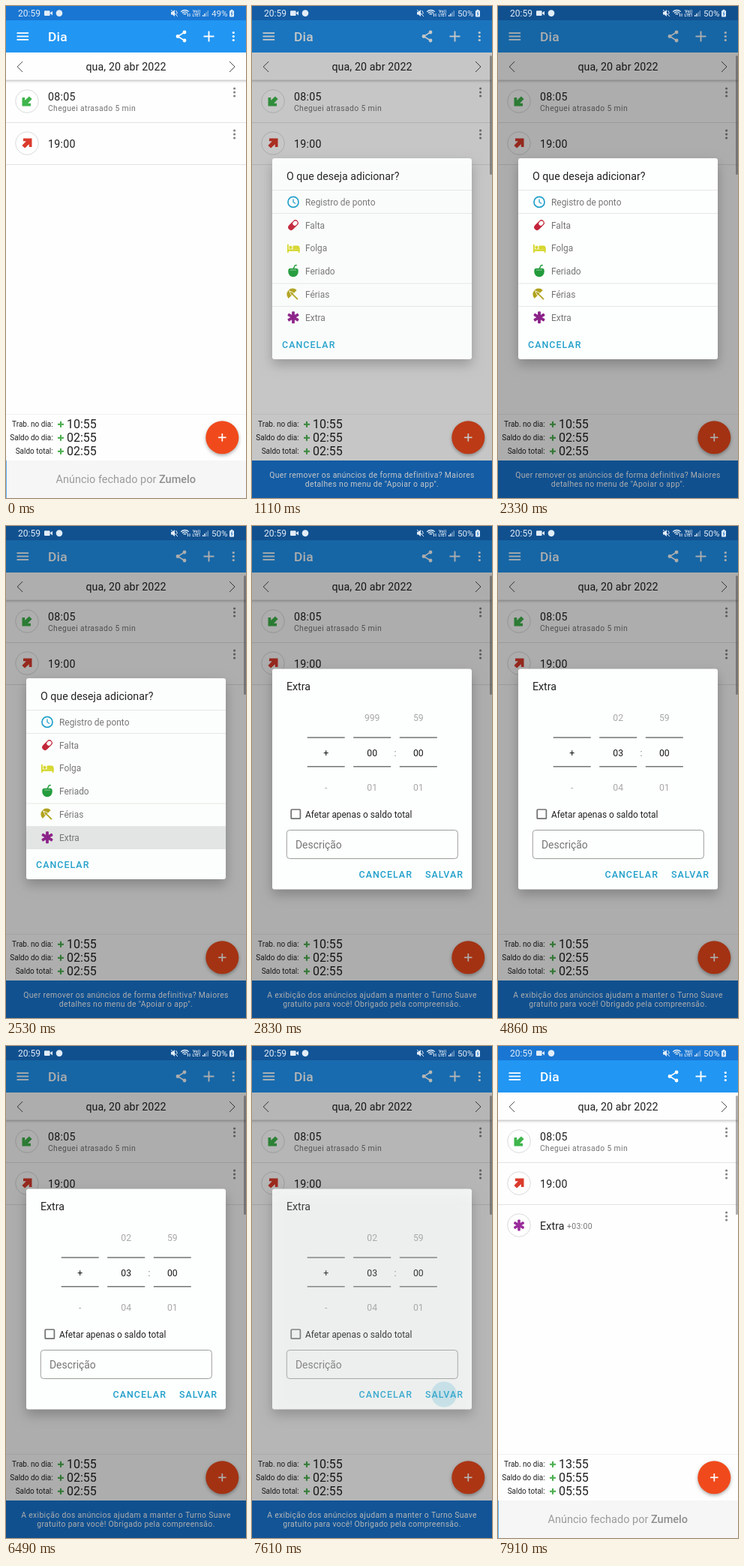
An HTML page with a canvas that plays this animation: 320 by 656 pixels, repeating every 8.53 s.

```html
<!DOCTYPE html>
<html lang="pt-BR">
<head>
<meta charset="utf-8">
<title>Registro do dia</title>
<style>
html, body { margin: 0; width: 100%; height: 100%; overflow: hidden; background: #fdfefd; }
canvas { display: block; width: 320px; height: 656px; }
</style>
</head>
<body>
<canvas id="stage"></canvas>
<script>
const LOOP = 8530, W = 320, H = 656;
const canvas = document.getElementById('stage');
const ctx = canvas.getContext('2d');
const dpr = window.devicePixelRatio || 1;
canvas.width = W * dpr;
canvas.height = H * dpr;

const INK = '#212121', GREY = '#757575', GREEN = '#3fb54c', RED = '#db3b2c',
      PURPLE = '#9a2c9b', ACCENT = '#219fca', LINE = '#e2e4e2';

const clamp = v => Math.max(0, Math.min(1, v));
const ramp = (t, a, b) => clamp((t - a) / (b - a));
const ease = v => v * v * (3 - 2 * v);

function text(str, x, y, size, color, { weight = 400, space = 0, align = 'left' } = {}) {
  ctx.font = `${weight} ${size}px Roboto, sans-serif`;
  ctx.letterSpacing = space + 'px';
  ctx.textAlign = align;
  ctx.fillStyle = color;
  ctx.fillText(str, x, y);
}
const caption = (str, x, y, color, align) => text(str, x, y, 10.4, color, { space: 0.346, align });
const button = (str, x, y) => text(str, x, y, 12.4, ACCENT, { weight: 500, space: 1.05 });

function rect(x, y, w, h, color) {
  ctx.fillStyle = color;
  ctx.fillRect(x, y, w, h);
}
function box(x, y, w, h, r, fill, stroke, width = 1) {
  ctx.beginPath();
  ctx.roundRect(x, y, w, h, r);
  if (fill) { ctx.fillStyle = fill; ctx.fill(); }
  if (stroke) { ctx.strokeStyle = stroke; ctx.lineWidth = width; ctx.stroke(); }
}
function disc(x, y, r, color) {
  ctx.beginPath();
  ctx.arc(x, y, r, 0, 2 * Math.PI);
  ctx.fillStyle = color;
  ctx.fill();
}
function ring(x, y, r, color, width = 1) {
  ctx.beginPath();
  ctx.arc(x, y, r, 0, 2 * Math.PI);
  ctx.strokeStyle = color;
  ctx.lineWidth = width;
  ctx.stroke();
}
function trace(points) {
  ctx.beginPath();
  points.forEach(([x, y]) => ctx.lineTo(x, y));
}
function line(points, color, width) {
  trace(points);
  ctx.strokeStyle = color;
  ctx.lineWidth = width;
  ctx.stroke();
}
function shape(points, color) {
  trace(points);
  ctx.fillStyle = color;
  ctx.fill();
}
function at(x, y, angle, draw) {
  ctx.save();
  ctx.translate(x, y);
  ctx.rotate(angle);
  draw();
  ctx.restore();
}
function shadow(blur, dy, alpha, draw) {
  ctx.save();
  ctx.shadowColor = `rgba(0,0,0,${alpha})`;
  ctx.shadowBlur = blur * dpr;
  ctx.shadowOffsetY = dy * dpr;
  draw();
  ctx.restore();
}
function plus(x, y, size, width, color) {
  rect(x - size / 2, y - width / 2, size, width, color);
  rect(x - width / 2, y - size / 2, width, size, color);
}
function kebab(x, y, color) {
  for (const d of [-5, 0, 5]) disc(x, y + d, 1.6, color);
}
function ripple(x, y, reach, p, color) {
  if (p <= 0 || p >= 1) return;
  ctx.save();
  ctx.globalAlpha *= 0.22 * Math.sin(Math.PI * p);
  disc(x, y, reach * (0.4 + 0.6 * p), color);
  ctx.restore();
}

function asterisk(x, y, size, color) {
  for (let i = 0; i < 3; i++) {
    at(x, y, i * Math.PI / 3, () => box(-size * 0.12, -size / 2, size * 0.24, size, 1, color));
  }
}
function arrow(x, y, angle, color) {
  at(x, y, angle, () => shape([
    [-6.5, -5], [-2.8, -5], [-2.8, -1.2], [2.9, -6.6], [6.6, -2.9],
    [1.2, 2.8], [5, 2.8], [5, 6.5], [-6.5, 6.5]
  ], color));
}

// The system icons stay bright above the dimmed window.
function statusIcons(t) {
  const c = '#e2edf8';
  text('20:59', 16, 14, 12, c);
  box(51, 6.2, 7.6, 6.8, 1, c);
  shape([[58.5, 9.6], [62, 6.8], [62, 12.6]], c);
  disc(71, 9.6, 4.3, c);
  shape([[220, 7.8], [222, 7.8], [225, 5], [225, 14], [222, 11.4], [220, 11.4]], c);
  line([[220, 5], [229, 14]], c, 1);
  line([[226.5, 6], [228.5, 9.5], [226.5, 11]], c, 1);
  for (const r of [2.5, 5, 7.5]) {
    ctx.beginPath();
    ctx.arc(238.5, 13, r, -2.35, -0.8);
    ctx.strokeStyle = c;
    ctx.lineWidth = 1.3;
    ctx.stroke();
  }
  line([[242.5, 10], [242.5, 14]], c, 1);
  line([[245, 10], [245, 14]], c, 1);
  text('Vo))', 249, 9, 5.5, c, { weight: 700 });
  text('LTE1', 248.5, 14, 5, c, { weight: 700 });
  for (let i = 0; i < 4; i++) {
    rect(262 + i * 2.2, 12 - i * 2, 1.4, 2 + i * 2, i < 2 ? c : 'rgba(217,232,247,.45)');
  }
  text(t < 100 ? '49%' : '50%', 274, 14, 11.6, c);
  box(298, 6, 6, 8.4, 1, c);
  rect(299.7, 4.8, 2.6, 1.5, c);
  line([[301.7, 7.4], [300.2, 10.2], [302, 10.2], [300.5, 13]], '#1976d2', 0.9);
}

function appBar() {
  rect(0, 0, W, 19, '#1976d2');
  rect(0, 19, W, 43, '#2196f3');
  for (const y of [35.2, 39.6, 44]) rect(14.5, y, 15.6, 1.8, '#fff');
  text('Dia', 56, 47, 17.4, '#fff', { weight: 500, space: 0.2 });
  line([[238, 35], [229, 40.5], [238, 46]], '#fff', 1.5);
  for (const [x, y] of [[238, 35], [229, 40.5], [238, 46]]) disc(x, y, 2.4, '#fff');
  plus(270.5, 40.5, 14, 1.9, '#fff');
  kebab(303.3, 40.5, '#fff');

  text('qua, 20 abr 2022', 160, 86, 14.2, INK, { space: 0.12, align: 'center' });
  line([[22.2, 74], [15.2, 81], [22.2, 88]], '#4a4a4a', 1);
  line([[298, 74], [305, 81], [298, 88]], '#4a4a4a', 1);
  rect(0, 98.6, W, 1, '#c6c8c6');
  const fade = ctx.createLinearGradient(0, 99.6, 0, 103);
  fade.addColorStop(0, 'rgba(0,0,0,.12)');
  fade.addColorStop(1, 'rgba(0,0,0,0)');
  rect(0, 99.6, W, 3.4, fade);
}

function badge(y) {
  disc(28, y, 15.3, '#fff');
  ring(28, y, 15.3, '#d9dbdc');
  kebab(304.6, y - 12, '#858585');
}
function entries(saved) {
  const title = { space: 0.3 };
  badge(127);
  arrow(28, 127, 0, GREEN);
  text('08:05', 56, 126.4, 14.2, INK, title);
  caption('Cheguei atrasado 5 min', 56, 140.1, GREY);
  rect(0, 155, W, 1, LINE);
  badge(183);
  arrow(28, 183, Math.PI, RED);
  text('19:00', 56, 188.6, 14.2, INK, title);
  rect(0, 211, W, 1, LINE);
  if (!saved) return;
  badge(239);
  asterisk(28, 239, 15, PURPLE);
  text('Extra', 56, 244.5, 14.2, INK, { space: 0.15 });
  caption('+03:00', 92, 244, GREY);
}

function totals(t, saved) {
  rect(0, 544, W, 1, '#f0f1f0');
  const rows = [
    ['Trab. no dia:', saved ? '13:55' : '10:55'],
    ['Saldo do dia:', saved ? '05:55' : '02:55'],
    ['Saldo total:', saved ? '05:55' : '02:55']
  ];
  rows.forEach(([label, value], i) => {
    const y = 557.8 + i * 18;
    text(label, 62.7, y + 3.6, 10, INK, { align: 'right' });
    plus(73, y, 8, 2.1, '#4caf50');
    text(value, 81, y + 5.6, 16, INK);
  });
  shadow(4, 2, 0.32, () => disc(288.3, 575.3, 22, '#f04a1c'));
  ripple(288.3, 575.3, 22, ramp(t, 700, 1050), '#fff');
  plus(288.3, 575.3, 10.5, 1.7, '#fff');
}

function banner(t) {
  if (t < 1000 || t >= 7790) {
    rect(0, 606, W, 50, '#f5f6f5');
    rect(0, 606, 1, 50, '#5fb0ee');
    text('Anúncio fechado por', 66.5, 636, 14.5, '#9b9b9b');
    text('Zumelo', 204, 636, 14.5, '#8f8f8f', { weight: 500 });
    return;
  }
  rect(0, 606, W, 50, '#1976d2');
  const lines = t < 2600
    ? ['Quer remover os anúncios de forma definitiva? Maiores', 'detalhes no menu de "Apoiar o app".']
    : ['A exibição dos anúncios ajudam a manter o Turno Suave', 'gratuito para você! Obrigado pela compreensão.'];
  lines.forEach((s, i) => caption(s, 160, 629 + i * 12, '#fff', 'center'));
}

function dialog(top, bottom, dim, alpha, draw) {
  if (dim > 0) rect(0, 0, W, H, `rgba(0,0,0,${0.32 * dim})`);
  if (alpha <= 0) return;
  ctx.save();
  ctx.globalAlpha = alpha;
  shadow(16, 7, 0.24, () => box(27, top, 266, bottom - top, 3, '#fdfffe'));
  draw();
  ctx.restore();
}

const options = [
  ['Registro de ponto', (x, y) => {
    ring(x, y, 7, ACCENT, 1.7);
    line([[x, y - 4], [x, y], [x + 3, y + 2.2]], ACCENT, 1.3);
  }],
  ['Falta', (x, y) => at(x, y, -Math.PI / 4, () => {
    box(-8, -3.9, 16, 7.8, 3.9, '#c2253a');
    box(0.2, -2.7, 6.6, 5.4, 2.7, '#fff');
  })],
  ['Folga', (x, y) => {
    const c = '#d6d72d';
    rect(x - 8, y - 5, 1.8, 11, c);
    rect(x - 8, y + 1.5, 16.5, 2.5, c);
    rect(x + 6.7, y, 1.8, 6, c);
    disc(x - 3.5, y - 1, 2.1, c);
    box(x - 0.5, y - 3.5, 9, 5, [1, 3, 0, 0], c);
  }],
  ['Feriado', (x, y) => {
    const c = '#229b3b';
    box(x - 6.7, y - 4, 13.4, 11.5, [3, 3, 6.7, 6.7], c);
    line([[x, y - 3], [x + 2.5, y - 8], [x + 5, y - 8]], c, 1.4);
    line([[x - 4, y - 1.6], [x + 4, y - 1.6]], '#9bd0a4', 0.9);
  }],
  ['Férias', (x, y) => {
    const c = '#b0a21d';
    at(x - 0.8, y, -Math.PI / 4, () => {
      ctx.beginPath();
      ctx.arc(0, 0, 7.8, Math.PI, 2 * Math.PI);
      ctx.fillStyle = c;
      ctx.fill();
      line([[-2.4, 0], [0, -6.5], [2.4, 0]], '#fff', 0.8);
      line([[0, 0], [0, 9.5]], c, 1.8);
    });
  }],
  ['Extra', (x, y) => asterisk(x, y, 16, '#8b2288')]
];

function chooser(t) {
  text('O que deseja adicionar?', 46, 231.5, 14.2, INK);
  const press = ramp(t, 2330, 2680);
  if (press > 0 && press < 1) rect(27, 400, 266, 31, `rgba(0,0,0,${0.1 * Math.sin(Math.PI * press)})`);
  for (const y of [245, 276, 369.5, 400]) rect(27, y, 266, 1, '#e6e8e6');
  options.forEach(([label, icon], i) => {
    const y = 261.4 + i * 30.75;
    icon(55, y);
    text(label, 71, y + 4.4, 11.9, GREY);
  });
  button('CANCELAR', 40, 456);
}

const pad = n => String(n).padStart(2, '0');
function wheel(x, value, label) {
  const step = 46.4, base = Math.round(value);
  ctx.save();
  ctx.beginPath();
  ctx.rect(x - 25, 236, 50, 132);
  ctx.clip();
  for (let n = base - 2; n <= base + 2; n++) {
    const d = (n - value) * step;
    const ink = Math.max(0, 1 - Math.abs(d) / 74);
    text(label(n), x, 306.8 + d, 12.2, `rgba(25,25,25,${ink})`, { align: 'center' });
  }
  ctx.restore();
  for (const y of [281.3, 320]) rect(x - 25, y, 50, 1.5, '#747674');
}

function extraForm(t) {
  const hours = 3 * ease(ramp(t, 3900, 4840));
  text('Extra', 46, 219, 14.2, INK);
  wheel(98.7, 0, n => ({ 0: '+', 1: '-' }[n] || ''));
  wheel(160.2, hours, n => pad((n + 1000) % 1000));
  wheel(221.8, 0, n => pad((n + 60) % 60));
  text(':', 191, 306.5, 12.2, GREY, { align: 'center' });
  box(52.2, 378, 12.2, 12.2, 1, null, '#707270', 1.7);
  text('Afetar apenas o saldo total', 71, 388.6, 11.9, INK);
  box(46.3, 405.5, 228, 38, 4, null, '#9c9e9c');
  text('Descrição', 58, 429.5, 13.9, GREY);
  ripple(256, 464.5, 26, ramp(t, 7500, 7760), ACCENT);
  button('CANCELAR', 142.5, 469);
  button('SALVAR', 231, 469);
}

function render(t) {
  const saved = t >= 7700;
  ctx.setTransform(dpr, 0, 0, dpr, 0, 0);
  rect(0, 0, W, H, '#fdfefd');
  appBar();
  entries(saved);
  totals(t, saved);
  banner(t);
  if (t >= 1000) box(317, 66, 3, 159, 1.5, 'rgba(90,90,90,.5)');

  dialog(203, 471,
    ramp(t, 960, 1180) - ramp(t, 2530, 2720),
    ramp(t, 960, 1116) - ramp(t, 2530, 2680),
    () => chooser(t));
  dialog(190.5, 484.5,
    ramp(t, 2580, 2800) - ramp(t, 7590, 7800),
    ramp(t, 2580, 2740) - ramp(t, 7590, 7740),
    () => extraForm(t));
  statusIcons(t);
}

const start = performance.now();
function tick() {
  render((performance.now() - start) % LOOP);
  requestAnimationFrame(tick);
}
tick();
</script>
</body>
</html>
```
